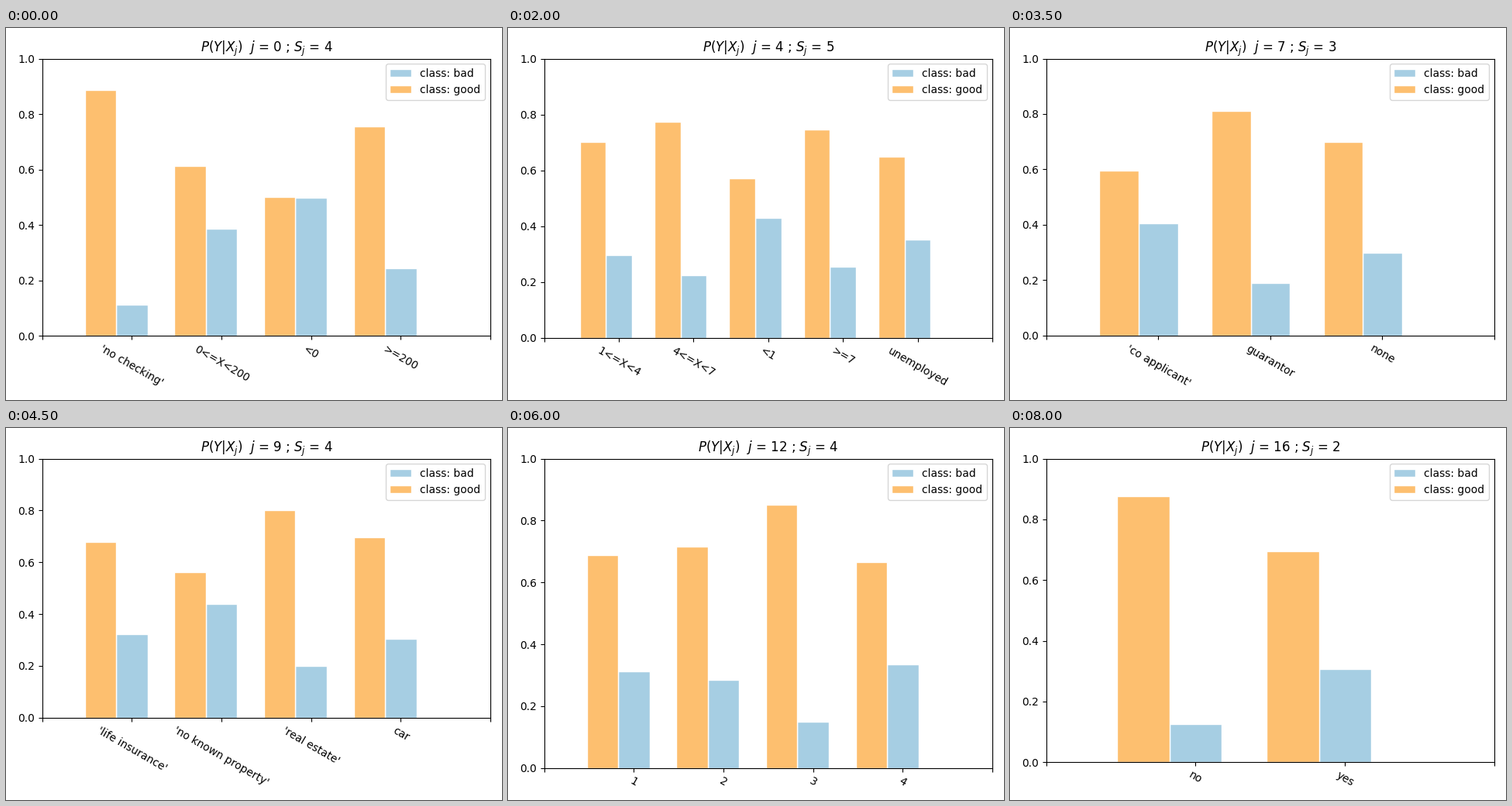
Write a matplotlib script that moves like this. It is 640 px wide and 480 px high and loops after 8.5 s.

```python
import matplotlib.pyplot as plt
import numpy as np
from matplotlib.animation import FuncAnimation

BAD, GOOD = "#a6cee3", "#fdbf6f"
WIDTH = 0.35

# For each feature: category -> share of the "good" class
FEATURES = [
    {"'no checking'": 0.887, "0<=X<200": 0.613, "<0": 0.502, ">=200": 0.756},
    {"'all paid'": 0.429, "'critical/other existing credit'": 0.829,
     "'delayed previously'": 0.682, "'existing paid'": 0.681,
     "'no credits/all paid'": 0.375},
    {"'domestic appliance'": 0.75, "'new car'": 0.637, "'used car'": 0.845,
     "business": 0.659, "education": 0.604, "furniture/equipment": 0.673,
     "other": 0.547, "radio/tv": 0.757, "repairs": 0.685,
     "retraining": 0.857},
    {"'no known savings'": 0.825, "100<=X<500": 0.67, "500<=X<1000": 0.825,
     "<100": 0.64, ">=1000": 0.875},
    {"1<=X<4": 0.703, "4<=X<7": 0.775, "<1": 0.571, ">=7": 0.746,
     "unemployed": 0.648},
    {"1": 0.75, "2": 0.732, "3": 0.713, "4": 0.666},
    {"'female div/dep/mar'": 0.648, "'male div/sep'": 0.6,
     "'male mar/wid'": 0.728, "'male single'": 0.734},
    {"'co applicant'": 0.595, "guarantor": 0.81, "none": 0.7},
    {"1": 0.723, "2": 0.685, "3": 0.711, "4": 0.7},
    {"'life insurance'": 0.678, "'no known property'": 0.561,
     "'real estate'": 0.801, "car": 0.696},
    {"bank": 0.59, "none": 0.725, "stores": 0.596},
    {"'for free'": 0.593, "own": 0.739, "rent": 0.609},
    {"1": 0.688, "2": 0.715, "3": 0.851, "4": 0.666},
    {"'high qualif/self emp/mgmt'": 0.655, "'unemp/unskilled non res'": 0.682,
     "'unskilled resident'": 0.72, "skilled": 0.705},
    {"1": 0.699, "2": 0.703},
    {"none": 0.686, "yes": 0.72},
    {"no": 0.875, "yes": 0.694},
]

fig, ax = plt.subplots(figsize=(6.4, 4.8), dpi=100)


def draw(j):
    shares = FEATURES[j]
    size = len(shares)
    x = np.arange(1, size + 1)
    good = np.array(list(shares.values()))

    ax.clear()
    ax.bar(x, 1 - good, WIDTH, color=BAD, edgecolor="white",
           label="class: bad")
    ax.bar(x - WIDTH, good, WIDTH, color=GOOD, edgecolor="white",
           label="class: good")
    ax.set_xlim(0, size + 1)
    ax.set_ylim(0, 1)
    ax.set_xticks(range(size + 2), ["", *shares, ""], rotation=-30)
    ax.set_title(f"$P(Y|X_j)$  $j$ = {j} ; $S_j$ = {size}")
    ax.legend(loc="best")
    fig.tight_layout()


anim = FuncAnimation(fig, draw, frames=len(FEATURES), interval=500,
                     repeat=True, repeat_delay=0, blit=False)
plt.show()
```
